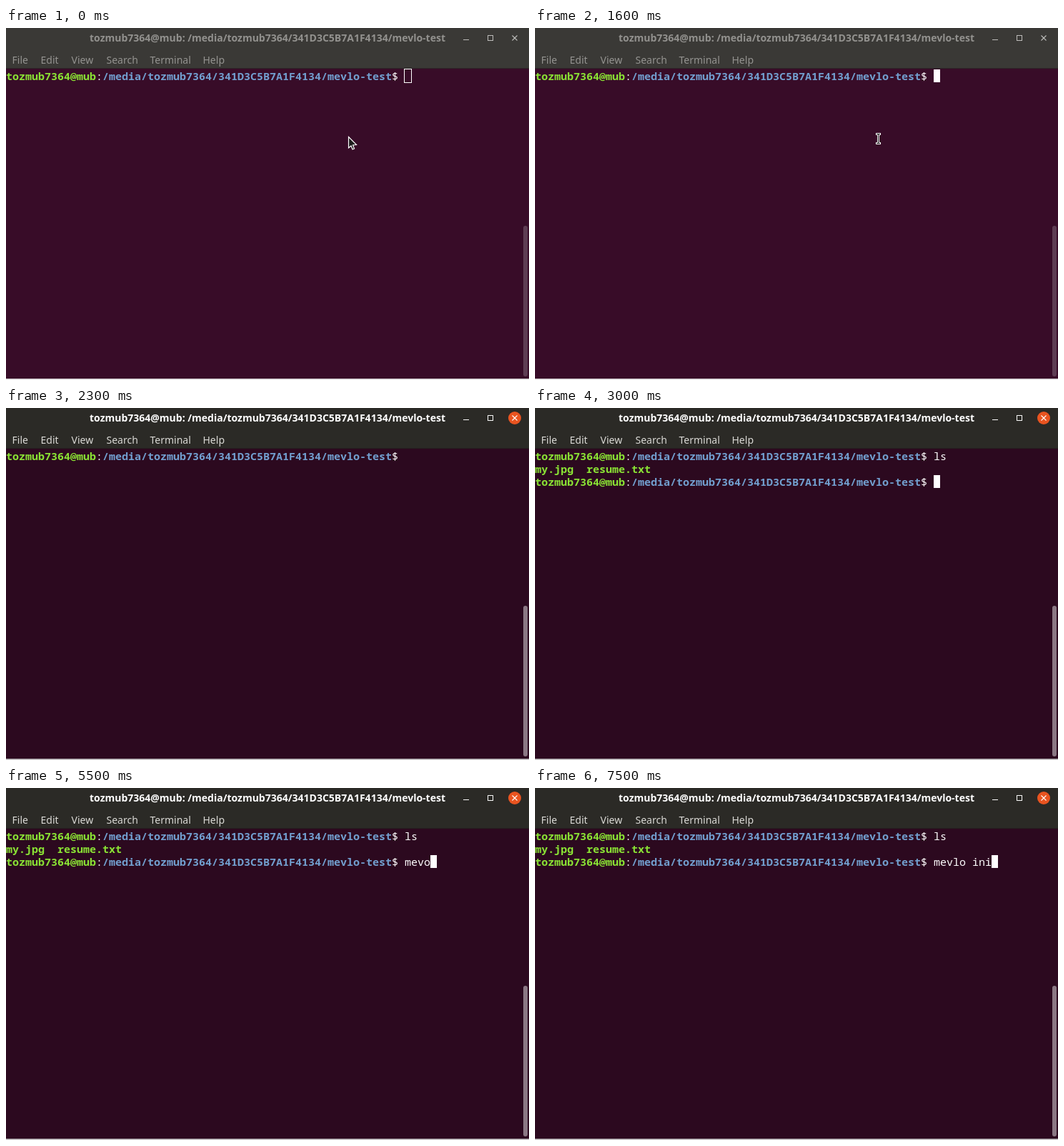
Recreate the animation shown at these times as an HTML page with a canvas. Size 732 px wide and 493 px high, loop 8000 ms.

```html
<!DOCTYPE html>
<html lang="en">
<head>
<meta charset="utf-8">
<title>Terminal session</title>
<style>
  html, body { margin: 0; width: 100%; height: 100%; overflow: hidden; background: #2c091f; }
  canvas { display: block; }
</style>
</head>
<body>
<canvas id="stage" width="732" height="493"></canvas>
<script>
const W = 732, H = 493, LOOP = 8000;
const CELL = 9, ROW = 18, TOP = 58;
const MONO = '15px "Noto Sans Mono", monospace';
const SANS = '14px "Noto Sans", sans-serif';
const GREEN = '#8ae234', BLUE = '#729fcf', WHITE = '#ffffff';
const USER = 'tozmub7364', HOST = 'mub', TOOL = 'mevlo';
const PATH = `/media/${USER}/341D3C5B7A1F4134/${TOOL}-test`;
const PROMPT_COLS = USER.length + HOST.length + PATH.length + 4;
const MENU = [['File', 8], ['Edit', 48], ['View', 91], ['Search', 140], ['Terminal', 201], ['Help', 275]];

// Each entry: time in ms, text typed so far.
const FIRST_LINE = [[0, ''], [2500, 'l'], [2600, 'ls']];
const SECOND_LINE = [
  [3000, ''], [4600, 'm'], [4800, 'me'], [5100, 'mev'], [5500, 'mevo'], [5900, 'mev'],
  [6000, 'mevl'], [6500, 'mevlo'], [6800, 'mevlo '], [7000, 'mevlo i'],
  [7200, 'mevlo in'], [7500, 'mevlo ini']
];
const CURSOR = [
  [0, 'hollow'], [1600, 'solid'], [2200, 'off'], [2500, 'solid'], [3500, 'off'], [4100, 'solid']
];
const POINTER = [[0, 'arrow'], [500, 'beam'], [2300, 'none']];
// Brightening after the window gains focus.
const WINDOW_FOCUS = [[0, 0], [1700, 1]];
const MENU_FOCUS = [[0, 0], [1700, 0.6], [1800, 0.85], [1900, 1]];
const SCROLL_FOCUS = [[0, 0], [1700, 0.25], [1800, 0.65], [1900, 1]];

const ctx = document.getElementById('stage').getContext('2d');

const at = (track, t) => track.reduce((value, [start, next]) => t >= start ? next : value, track[0][1]);

function mix(a, b, k) {
  return `rgb(${a.map((v, i) => Math.round(v + (b[i] - v) * k)).join(',')})`;
}

function box(x, y, w, h, color) {
  ctx.fillStyle = color;
  ctx.fillRect(x, y, w, h);
}

function label(str, x, y, color, font) {
  ctx.font = font;
  ctx.fillStyle = color;
  ctx.fillText(str, x, y);
}

function cells(str, col, row, color, bold) {
  label(str, col * CELL, TOP + row * ROW + 15, color, (bold ? 'bold ' : '') + MONO);
}

function line(points, color, width) {
  ctx.beginPath();
  points.forEach(([x, y], i) => i ? ctx.lineTo(x, y) : ctx.moveTo(x, y));
  ctx.strokeStyle = color;
  ctx.lineWidth = width;
  ctx.stroke();
}

function drawHeader(t) {
  const focus = at(WINDOW_FOCUS, t);
  const fg = mix([146, 145, 142], [255, 255, 255], focus);
  box(0, 0, W, 57, mix([58, 57, 54], [43, 42, 38], focus));
  box(0, 56, W, 1, mix([44, 40, 40], [36, 33, 31], focus));

  ctx.textAlign = 'center';
  label(`${USER}@${HOST}: ${PATH}`, W / 2, 19, fg, 'bold ' + SANS);
  ctx.textAlign = 'left';
  const menuColor = mix([148, 147, 144], [218, 217, 213], at(MENU_FOCUS, t));
  MENU.forEach(([name, x]) => label(name, x + 0.5, 50, menuColor, SANS));

  const icon = mix([190, 189, 187], [255, 255, 255], focus);
  box(640, 16, 8, 1, icon);
  ctx.strokeStyle = icon;
  ctx.lineWidth = 1;
  ctx.strokeRect(674.5, 10.5, 7, 7);
  if (focus) {
    ctx.fillStyle = '#e95420';
    ctx.beginPath();
    ctx.arc(712, 14, 9, 0, Math.PI * 2);
    ctx.fill();
  }
  line([[708.5, 10.5], [715.5, 17.5]], icon, 1.1);
  line([[715.5, 10.5], [708.5, 17.5]], icon, 1.1);
}

function drawPrompt(row, typed) {
  const user = `${USER}@${HOST}`;
  cells(user, 0, row, GREEN, true);
  cells(':', user.length, row, WHITE);
  cells(PATH, user.length + 1, row, BLUE, true);
  cells('$ ' + typed, PROMPT_COLS - 2, row, WHITE);
}

function drawCursor(kind, col, row) {
  const x = col * CELL, y = TOP + row * ROW;
  if (kind === 'solid') box(x, y, CELL, ROW, WHITE);
  if (kind === 'hollow') {
    ctx.strokeStyle = WHITE;
    ctx.lineWidth = 1;
    ctx.strokeRect(x - 0.5, y - 0.5, CELL + 1, ROW + 1);
  }
}

function drawPointer(kind) {
  if (kind === 'arrow') {
    ctx.beginPath();
    [[479.5, 152.5], [479.5, 168], [483, 165], [485, 170], [487.5, 169], [485.5, 164], [490.5, 163.5]]
      .forEach(([x, y]) => ctx.lineTo(x, y));
    ctx.closePath();
    ctx.fillStyle = '#1c1c1c';
    ctx.fill();
    ctx.strokeStyle = WHITE;
    ctx.lineWidth = 1.2;
    ctx.stroke();
  } else if (kind === 'beam') {
    box(477, 147, 7, 3, WHITE);
    box(477, 160, 7, 3, WHITE);
    box(479, 149, 3, 12, WHITE);
    box(478, 148, 5, 1, '#111');
    box(478, 161, 5, 1, '#111');
    box(480, 148, 1, 14, '#111');
  }
}

function drawScrollbar(t) {
  ctx.fillStyle = mix([94, 61, 83], [139, 120, 132], at(SCROLL_FOCUS, t));
  ctx.beginPath();
  ctx.roundRect(724, 277, 6, 211, 3);
  ctx.fill();
}

function drawBottomEdge(t) {
  const focus = at(WINDOW_FOCUS, t);
  box(0, 491, W, 1, mix([205, 202, 204], [150, 142, 147], focus));
  box(0, 492, W, 1, mix([236, 235, 236], [210, 208, 209], focus));
}

function draw(t) {
  const entered = t >= 3000;
  const first = at(FIRST_LINE, t), second = at(SECOND_LINE, t);
  box(0, 0, W, H, mix([56, 12, 40], [44, 9, 31], at(WINDOW_FOCUS, t)));
  drawHeader(t);
  drawPrompt(0, first);
  if (entered) {
    cells('my.jpg  resume.txt', 0, 1, GREEN, true);
    drawPrompt(2, second);
  }
  drawCursor(at(CURSOR, t), PROMPT_COLS + (entered ? second : first).length, entered ? 2 : 0);
  drawPointer(at(POINTER, t));
  drawScrollbar(t);
  drawBottomEdge(t);
}

const begin = performance.now();
function tick() {
  draw((performance.now() - begin) % LOOP);
  requestAnimationFrame(tick);
}
tick();
</script>
</body>
</html>
```
